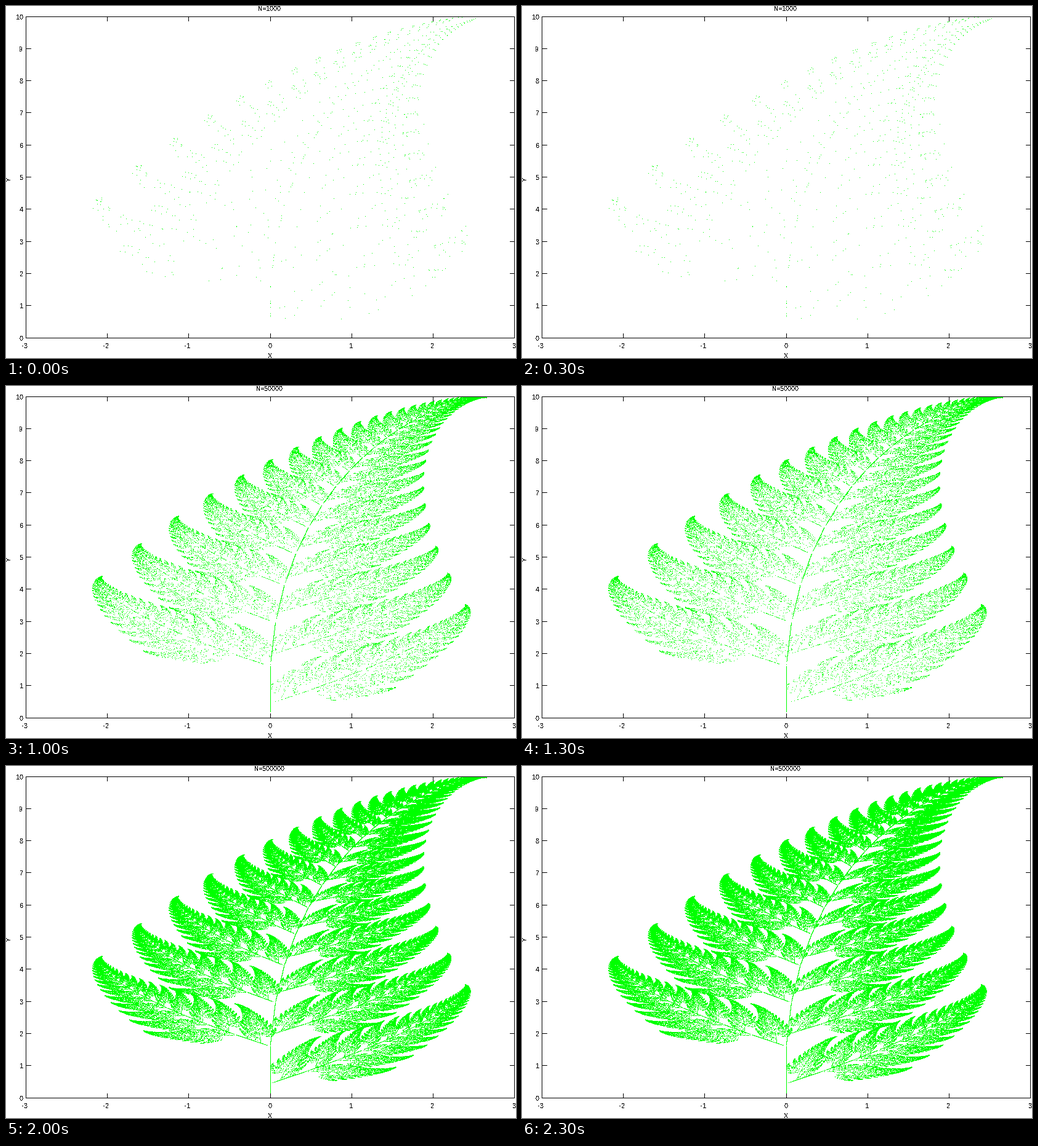
A matplotlib script that plays this animation: 828x573 px, repeating every 2500 ms.

```python
"""Barnsley fern drawn by the chaos game with a growing number of points."""
import random

import matplotlib.pyplot as plt
import numpy as np
from matplotlib.animation import FuncAnimation

W, H, DPI = 828, 573, 64
# Axes edges lie between pixels; everything is floored to the pixel grid.
LEFT, RIGHT, TOP, BOTTOM = 32.3, 825.8, 17, 540
TICK = 8
COUNTS = [1000, 10000, 50000, 100000, 500000]
GREEN = (0, 255, 0)

# x' = a x + b y, y' = c x + d y + f
MAPS = [
    (0.00, 0.00, 0.00, 0.16, 0.00),
    (0.85, 0.04, -0.04, 0.85, 1.60),
    (0.20, -0.26, 0.23, 0.22, 1.60),
    (-0.15, 0.28, 0.26, 0.24, 0.44),
]
ODDS = [0.01, 0.85, 0.07, 0.07]

plt.rcParams.update({
    "font.family": "Liberation Sans",
    "font.size": 11 * 72 / DPI,
    "text.antialiased": False,
    "text.hinting": "native",
    "text.hinting_factor": 1,
})


def px(x):
    x = np.asarray(x)
    return np.floor(LEFT + (x + 3) / 6 * (RIGHT - LEFT)).astype(int)


def py(y):
    y = np.asarray(y)
    return np.floor(BOTTOM - y / 10 * (BOTTOM - TOP)).astype(int)


def fern(count):
    """Follow one walker through count random jumps."""
    rng = random.Random(count)
    x = y = 0.0
    points = []
    for a, b, c, d, f in rng.choices(MAPS, ODDS, k=count):
        x, y = a * x + b * y, c * x + d * y + f
        points.append((x, y))
    return np.array(points).T


def draw_axes(img):
    left, right, top, bottom = px(-3), px(3), py(10), py(0)
    img[[top, bottom], left:right + 1] = 0
    img[top:bottom + 1, [left, right]] = 0
    for col in px(range(-2, 3)):
        img[top:top + TICK, col] = 0
        img[bottom - TICK + 1:bottom, col] = 0
    for row in py(range(1, 10)):
        img[row, left:left + TICK + 1] = 0
        img[row, right - TICK + 1:right] = 0


def plot(count):
    img = np.full((H, W, 3), 255, np.uint8)
    x, y = fern(count)
    img[py(y), px(x)] = GREEN
    draw_axes(img)
    return img


fig = plt.figure(figsize=(W / DPI, H / DPI), dpi=DPI, facecolor="white")
plots = [plot(n) for n in COUNTS]
image = fig.figimage(plots[0], origin="upper")


def label(x, y, text, ha="center", **style):
    return fig.text(x / W, 1 - y / H, text, ha=ha, va="baseline", **style)


for v in range(-3, 4):
    label(px(v) - 0.5 - (v < 0), 557, str(v))
for v in range(11):
    label(28, py(v) + 5, str(v), ha="right")
label(428, 573, "X")
label(8, 281.5, "Y", rotation=90, rotation_mode="anchor")
title = label(428, 8, "")


def draw(i):
    image.set_data(plots[i])
    title.set_text(f"N={COUNTS[i]}")
    return image, title


anim = FuncAnimation(fig, draw, frames=len(COUNTS), interval=500,
                     repeat=True, repeat_delay=0, blit=False)
plt.show()
```
